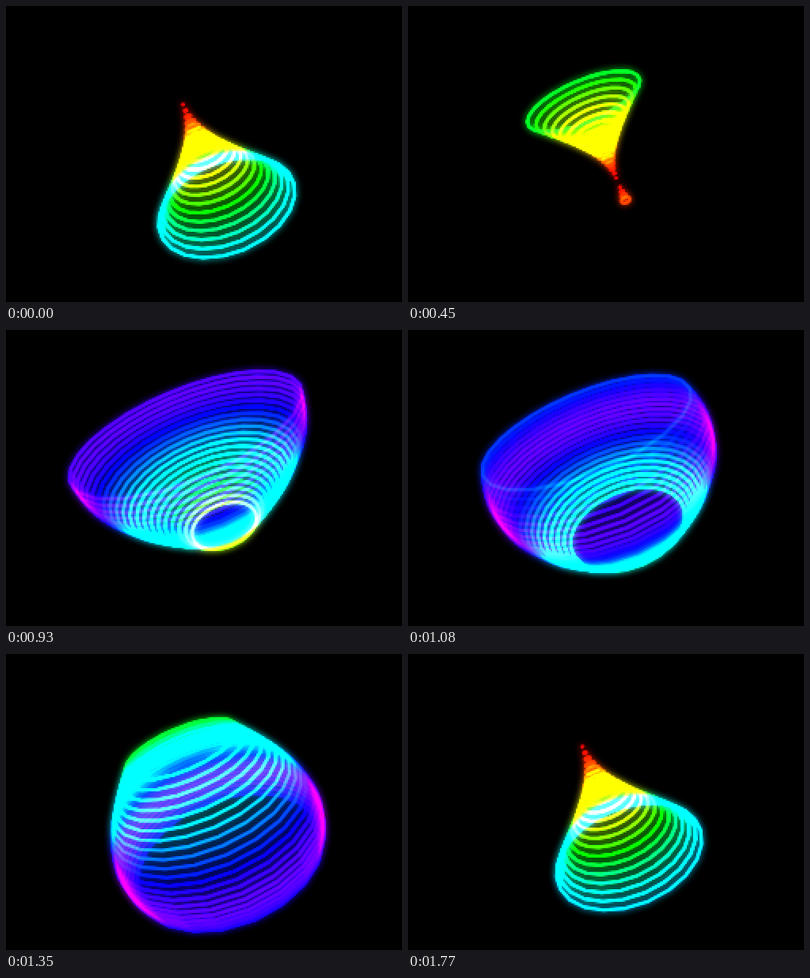
Animation of 500x375 px, one loop 1800 ms. Source, as an HTML page with a canvas:

```html
<!DOCTYPE html>
<html lang="en">
<head>
<meta charset="utf-8">
<title>Pulsing rings</title>
<style>
  html, body { margin: 0; width: 100%; height: 100%; overflow: hidden; background: #000; }
  canvas { position: absolute; left: 0; top: 0; width: 500px; height: 376px; image-rendering: pixelated; }
</style>
</head>
<body>
<canvas id="view" width="250" height="188"></canvas>
<script>
  const LOOP = 1800, STEP = 30;
  const RINGS = 21, SIDES = 24;
  const RADIUS = 137, HALF = 80, DIST = 430;
  const TILT = Math.PI / 6, ROLL = -23 * Math.PI / 180;
  const sinT = Math.sin(TILT), cosT = Math.cos(TILT);

  const view = document.getElementById('view');
  const out = view.getContext('2d');
  const lines = document.createElement('canvas');
  lines.width = view.width;
  lines.height = view.height;
  const pen = lines.getContext('2d');

  // Perspective view from above, in stage pixels around the centre
  function project(x, y, z) {
    const k = DIST / (DIST + z * cosT - y * sinT);
    return [x * k, -(y * cosT + z * sinT) * k];
  }

  function drawRing(radius, y, hue) {
    pen.beginPath();
    for (let i = 0; i < SIDES; i++) {
      const a = i / SIDES * 2 * Math.PI;
      pen.lineTo(...project(radius * Math.cos(a), y, radius * Math.sin(a)));
    }
    pen.closePath();
    pen.strokeStyle = `hsl(${hue}, 100%, 50%)`;
    pen.stroke();
  }

  function drawLines(time) {
    pen.setTransform(1, 0, 0, 1, 0, 0);
    pen.clearRect(0, 0, lines.width, lines.height);
    pen.scale(0.5, 0.5);
    pen.translate(250, 187.5);
    pen.rotate(ROLL);
    pen.globalCompositeOperation = 'lighter';
    pen.lineWidth = 4.2;
    pen.lineJoin = 'round';
    for (let i = 0; i < RINGS; i++) {
      const s = i / (RINGS - 1);
      const size = Math.sin(Math.PI * time / LOOP - s) ** 2;
      const radius = RADIUS * size;
      if (radius > 0.15) drawRing(radius, HALF * (1 - 2 * s), 255 * size);
    }
  }

  function render(time) {
    drawLines(time);
    out.globalCompositeOperation = 'source-over';
    out.filter = 'none';
    out.fillStyle = '#000';
    out.fillRect(0, 0, view.width, view.height);
    out.globalCompositeOperation = 'lighter';
    out.drawImage(lines, 0, 0);
    out.filter = 'blur(2.2px)';
    out.drawImage(lines, 0, 0);
  }

  let shown = -1;
  function tick(now) {
    const time = Math.floor(Math.max(now, 0) / STEP) * STEP % LOOP;
    if (time !== shown) render(shown = time);
    requestAnimationFrame(tick);
  }
  tick(0);
</script>
</body>
</html>
```
